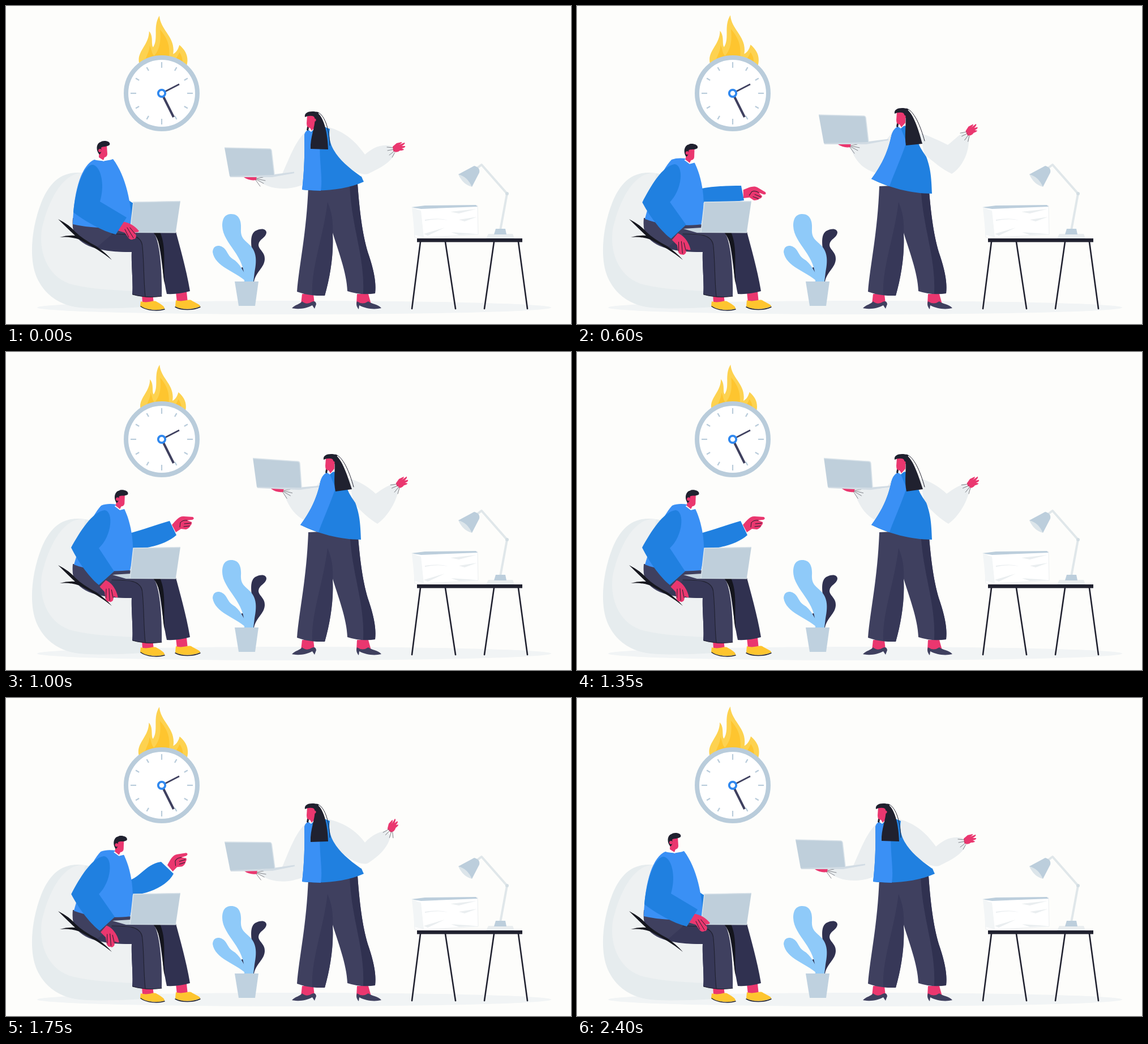
Animation of 998x561 px, one loop 2.45 s. Source, as an HTML page:

```html
<!DOCTYPE html>
<html lang="en">
<head>
<meta charset="utf-8">
<title>Office deadline</title>
<style>
  html, body { margin: 0; width: 100%; height: 100%; overflow: hidden; background: #fdfdfb; }
  svg { display: block; width: 100vw; height: 100vh; }
  .sky { fill: #3a90f5 } .blue { fill: #2080e0 } .skin { fill: #ea376f }
  .navy { fill: #3f405f } .dusk { fill: #373858 } .night { fill: #303150 } .ink { fill: #20212f }
  .cloth { fill: #eaeef0 } .steel { fill: #bccedc } .leaf { fill: #8fcaf9 }
  .sun { fill: #fec52f } .line { fill: none; stroke: #20212f; stroke-linecap: round }
  .crease { stroke: #55565f; stroke-width: .7 }
</style>
</head>
<body>
<svg viewBox="0 0 998 561">
  <ellipse cx="509" cy="532" rx="454" ry="12" fill="#f1f4f5"/>

  <g id="flame">
    <path fill="#fdd250" d="M238 108C226 82 253 72 253 45C261 54 256 68 260 73C270 58 259 37 271 18C273 44 300 55 295 85C301 82 304 76 306 69C319 80 323 92 318 108Z"/>
    <path class="sun" d="M246 108C243 92 254 84 254 70C258 78 257 84 262 88C272 76 274 62 272 42C286 58 293 74 285 108ZM290 108C296 98 303 90 306 82C313 92 312 100 310 108Z"/>
  </g>
  <circle cx="275" cy="154" r="63" fill="#fff" stroke="#b9ccdb" stroke-width="8"/>
  <g id="ticks" stroke="#b9ccdb" stroke-width="2.2"></g>
  <path d="M275 154L306 138" stroke="#3f405f" stroke-width="2.6"/>
  <path d="M275 154L296 196" stroke="#3f405f" stroke-width="4"/>
  <circle cx="275" cy="154" r="6.2" fill="#fff" stroke="#2f88ef" stroke-width="3.8"/>

  <!-- bean bag and seated man -->
  <path fill="#e6ecee" d="M150 297C105 286 80 305 63 345C45 390 40 445 54 478C70 514 100 529 130 532C165 535 205 533 240 531L245 400L130 320Z"/>
  <path fill="#eef1f2" d="M140 295C100 290 74 345 63 395C57 440 78 483 120 492C155 500 190 501 224 503L224 434L120 390Z"/>
  <path class="skin" d="M240 506H259L261 525H241ZM300 504H319L321 523H302Z"/>
  <path class="sun" d="M238 521C250 525 258 519 265 521C272 525 281 530 280 534C266 538 245 536 237 529ZM300 519C312 523 320 517 327 519C335 524 344 527 343 530C330 536 308 536 299 530Z"/>
  <path class="line" stroke-width="1.5" d="M238 530C248 537 267 539 280 535M299 531C310 537 330 537 343 531"/>
  <path class="night" d="M225 398H300C307 425 318 462 325 503Q305 509 284 508C276 470 274 430 266 404Z"/>
  <path class="navy" d="M118 374C150 374 200 380 222 386L259 398C272 408 276 470 275 512Q250 516 223 509C225 490 221 455 222 434C185 434 140 431 123 405Q116 396 118 374Z"/>
  <path class="dusk" d="M187 403C215 402 240 402 241 425C244 455 243 485 246 513L223 509C225 490 221 455 222 434Q185 434 160 426Z"/>
  <path fill="#14151d" d="M260 399H272C284 425 277 460 281 492C274 470 280 425 260 399Z"/>
  <path class="line" stroke-width="1.1" d="M187 402C215 402 240 402 241 425C244 455 243 485 246 512M224 509Q250 516 275 512"/>
  <path fill="#16171f" d="M92 376Q112 386 122 398Q135 411 160 424Q178 437 187 448Q165 430 130 412Q112 406 95 408Q108 404 122 405Q108 392 92 376Z"/>
  <g id="farHand">
    <path class="skin" d="M293 305C300 297 306 289 314 290L330 291Q334 294 329 296L320 297L328 300Q329 303 326 306Q324 311 318 313L309 312L300 318Z"/>
    <path class="line" stroke-width="1" d="M320 297Q312 296 308 301M326 302L315 303M324 307L314 308M308 301L307 309"/>
  </g>
  <path id="farSleeve" class="blue"/>
  <path id="torso" class="sky"/>
  <path fill="#c8d5de" d="M188 393L220 391V398L300 397V400.500L212 400Z"/>
  <path fill="#bfcfdb" d="M225 346L308 344L300 398L219 399Z"/>
  <path fill="none" stroke="#d8e2e9" stroke-width="1.600" d="M219 399L225 346L308 344.500"/>
  <g id="nearHand">
    <path class="skin" d="M202 381C214 379 228 388 235 397Q233 400 228 399L230 406Q229 412 225 411Q222 414 217 410L210 400L198 396Z"/>
    <path class="line" stroke-width="1" d="M214 391L225 409M219 391L228 402M210 394L217 408"/>
  </g>
  <path id="nearArm" class="blue"/>
  <g id="manHead">
    <path fill="#fff" d="M162 268L172 274L183 270L178 265H166Z"/>
    <path class="skin" d="M165 248L178 246L179 261Q179 266 174 267L172 272L164 267Z"/>
    <path class="ink" d="M165 262C157 253 161 241 167 240C171 236 186 238 183 245C178 249 171 247 168 250Q170 258 165 262Z"/>
    <circle class="skin" cx="166" cy="255" r="3"/>
  </g>

  <!-- plant -->
  <path class="night" d="M432 486C428 470 436 462 436 445C434 425 429 405 440 397C451 391 460 393 460 400C459 409 447 411 446 421C446 430 458 434 457 447C456 462 442 468 438 486ZM415 462L422 459L425 480Z"/>
  <path class="leaf" d="M424 486C405 468 369 460 365 434C366 423 374 421 382 425C391 430 391 440 400 446C413 453 421 470 428 486Z"/>
  <path class="leaf" d="M421 486C424 440 383 420 382 388C382 372 389 367 398 367C411 367 416 378 415 393C414 410 422 413 431 422C443 434 443 450 439 470L437 486Z"/>
  <path fill="#bfd1df" d="M404 486H446L440 529H411Z"/>

  <!-- table, papers and lamp -->
  <path fill="#fff" stroke="#eceff1" d="M720 357L833 352L834 403L736 409L722 408Z"/>
  <path fill="#f2f5f6" d="M717 356L733 361L738 408L722 404Z"/>
  <path class="cloth" d="M740 377Q765 373 781 378Q760 374 740 379ZM785 363L831 358L800 366ZM738 402L775 391L745 405ZM800 377L832 372L810 380ZM786 399L832 402L800 404Z"/>
  <path class="steel" d="M716 355L740 352L830 351L833 354L733 358Z"/>
  <path fill="none" stroke="#e0e7ea" stroke-width="4" stroke-linejoin="round" d="M873 396L885 331L840 280L828 289"/>
  <circle cx="885" cy="331" r="3" fill="#d3dde3"/>
  <path class="steel" d="M799 297L827 282Q838 285 836 294L823 319Z"/>
  <path fill="#dce5ea" d="M799 297Q815 301 823 319Q807 315 799 297Z"/>
  <path class="cloth" d="M852 402H895L898 410H848Z"/>
  <path class="steel" d="M865 393H882L884 403H862Z"/>
  <path class="ink" d="M726 410H912V416.500H726Z"/>
  <path class="line" stroke-width="2.600" d="M732 416L717 534M776 416L794 534M862 416L845 534M905 416L921 534"/>

  <!-- standing woman -->
  <path class="skin" d="M523 508H543L545 526H521ZM620 508H640L645 526H619Z"/>
  <path class="navy" d="M505 533C512 526 518 527 523 521Q531 528 540 522Q547 519 548 526L545 534L541 528C532 533 518 536 505 533ZM620 521Q630 528 640 521C646 526 658 526 663 533C650 536 635 534 624 528L623 535Q617 528 620 521Z"/>
  <path class="navy" d="M534 318L621 314C625 370 631 410 641 440C651 470 654 490 652 507Q628 511 603 503C602 470 586 430 577 400C579 440 572 480 563 511Q535 512 514 504C518 455 531 400 534 318Z"/>
  <path class="dusk" d="M568 346C576 365 578 380 577 405C579 440 572 480 563 511L541 510C539 460 560 410 568 346Z"/>
  <path class="night" d="M607 314H621C625 370 631 410 641 440C651 470 654 490 652 507L631 508C634 440 610 392 607 314Z"/>
  <g id="backHand">
    <path class="skin" d="M683 248L690 242L699 240Q700 242 694 245L704 241Q706 243 699 247L705 247Q706 250 699 251L703 253Q702 255 696 255Q690 260 684 256Z"/>
  </g>
  <path id="backSleeve" class="cloth"/>
  <path id="frontSleeve" class="cloth"/>
  <path id="backCuff" class="line crease" d="M684 250L673 249M685 253L674 255M686 256L677 263M687 258L682 267"/>
  <g id="laptop">
    <path class="skin" d="M420 302L443 301L442 307Q430 309 420 302Z"/>
    <path class="line crease" d="M443 304L454 302M443 305L458 308M442 306L455 313M441 307L449 318"/>
    <path fill="#d2dce4" d="M395 299L474 297L509 292.500V295L470 302H396Z"/>
    <path fill="#bfcfdb" d="M386 250L466 252Q468 252 469 255L474 298L395 300Z"/>
    <path fill="none" stroke="#d8e2e9" stroke-width="1.600" d="M386 250L466 252Q468 252 469 255L474 298"/>
  </g>
  <path id="vest" class="blue"/>
  <path id="vestLight" class="sky"/>
  <g id="womanHead">
    <path fill="#fff" d="M533 218L539 222L545 217L536 214Z"/>
    <path class="ink" d="M533 207L536 209L534 220L531 219Z"/>
    <path class="skin" d="M532 193H547L547 212L540 220L537 215Q531 215 531 207Z"/>
  </g>
  <path id="hair" class="ink"/>
  <path id="hairLine" class="line" stroke-width="1"/>
  <g id="fringe">
    <path class="ink" d="M528 196C526 186 541 184 552 188L550 206L545 200Q546 195 541 194Q534 193 528 196Z"/>
    <circle class="skin" cx="545" cy="201" r="2.600"/>
  </g>
</svg>
<script>
const LOOP = 2450, STEP = 50;
const $ = id => document.getElementById(id);

// Two-pose parts: out between go[0..1], back between go[2..3].
const there = (a, b, go) => [[go[0], a], [go[1], b], [go[2], b], [go[3], a]];
const MAN = [350, 650, 1700, 2060], WOMAN = [30, 330, 1400, 1700];

// The arms lag behind the bodies and settle after overshooting.
const swing = (rest, rise, ease, hold, fall) =>
  [[30, rest], [350, rise], [600, ease], [850, hold], [1390, hold], [1750, fall], [2150, rest]];
const point = (rest, out, up, end) =>
  [[350, rest], [600, out], [900, up], [1400, up], [1750, end], [2060, rest]];

const wave = swing('translate(0 0) rotate(0 684 254)', 'translate(23 -56) rotate(-22 684 254)',
  'translate(5 -28) rotate(-16 684 254)', 'translate(7 -17) rotate(-13 684 254)',
  'translate(-6 -19) rotate(-35 684 254)');

const tracks = {
  torso: there(
    'M156 271C135 280 120 320 118 385C150 392 190 394 222 388C222 350 212 300 189 270C178 274 166 274 156 271Z',
    'M168 271C150 290 130 340 120 375C150 387 190 388 219 385C230 350 222 300 207 273C196 268 180 266 168 271Z', MAN),
  nearArm: there(
    'M152 280C166 280 176 312 166 345L213 373L194 403C170 397 140 380 119 364C122 330 134 283 152 280Z',
    'M174 279C191 281 187 325 164 346L191 387L164 411C150 400 130 375 115 345C130 318 152 282 174 279Z', MAN),
  nearHand: there('translate(0 0) rotate(0 204 387)', 'translate(-29 22) rotate(28 204 387)', MAN),
  manHead: there('translate(0 0) rotate(0 170 255)', 'translate(31 5) rotate(6 170 255)', MAN),
  farSleeve: point(
    'M212 340C216 342 221 346 225 348L225 372C220 374 214 376 210 376Z',
    'M220 322C240 318 265 317 290 317L295 343C270 346 245 347 222 347Z',
    'M218 320C240 314 262 306 289 298L301 323C285 338 252 347 223 348Z',
    'M216 322C236 318 248 292 274 289L296 310C286 330 255 345 222 348Z'),
  farHand: point('translate(-58 72) rotate(27 296 310)', 'translate(-2 20) rotate(27 296 310)',
    'translate(0 0) rotate(0 296 310)', 'translate(-7 -11) rotate(-12 296 310)'),
  vest: there(
    'M534 218C528 222 527 225 527 232C528 265 526 300 523 324C560 328 600 324 632 310C628 302 629 301 626 300C592 276 566 250 572 217L560 212Z',
    'M570 211C560 215 557 222 555 230C548 262 535 285 520 305C550 320 590 331 627 331C626 300 624 285 617 266C610 255 598 242 602 222L592 212Z', WOMAN),
  vestLight: there(
    'M534 218C528 222 527 225 527 232C528 265 526 300 523 324L556 326C560 300 552 270 555 235Z',
    'M570 211C560 215 557 222 555 230C548 262 535 285 520 305L552 318C558 300 572 270 582 240Z', WOMAN),
  womanHead: there('translate(0 0)', 'translate(33 -6)', WOMAN),
  fringe: there('translate(0 0)', 'translate(33 -6)', WOMAN),
  hair: swing(
    'M546 187C558 189 568 215 569 253L538 252C537 232 546 215 546 196Z',
    'M579 181C592 183 606 205 610 246L579 246C579 228 582 210 580 190Z',
    'M579 181C591 183 602 212 610 243L581 246C578 228 582 210 580 190Z',
    'M579 181C591 183 602 214 611 242L582 246C578 228 582 210 580 190Z',
    'M546 187C558 189 568 215 569 253L538 254C537 232 546 215 546 196Z'),
  hairLine: there('M549 187C562 190 571 215 572 246', 'M582 181C595 184 607 212 614 238', WOMAN),
  backSleeve: swing(
    'M570 214C600 222 618 240 634 262C650 248 665 243 681 247L686 262C676 280 655 288 640 296C630 300 600 290 575 255Z',
    'M605 217C630 215 655 222 672 226C682 215 692 204 703 197L714 206C714 235 705 255 683 268C660 268 640 265 612 250Z',
    'M605 224C625 230 645 240 655 245C665 238 673 228 682 224L692 230C694 258 680 285 662 296C645 288 630 275 614 262Z',
    'M605 223C625 228 640 238 653 250C663 243 673 236 684 233L694 238C692 260 675 290 656 303C642 295 628 282 614 266Z',
    'M570 214C600 221 620 236 634 255C648 240 660 236 673 234L679 243C676 262 660 278 640 291C630 297 600 285 575 255Z'),
  backHand: wave,
  backCuff: wave,
  frontSleeve: swing(
    'M442 304C460 300 470 300 488 296C503 262 512 238 529 222L528 314C500 326 462 326 442 304Z',
    'M460 256C475 250 500 249 515 246C525 240 540 225 562 216L528 300C500 296 475 275 460 256Z',
    'M483 248C500 242 520 243 545 238C550 232 555 225 560 220L535 296C510 292 490 275 483 248Z',
    'M490 246C500 242 520 243 545 240C550 235 555 228 558 222L538 299C520 298 500 280 490 246Z',
    'M444 307C460 302 470 302 488 298C503 262 512 238 529 222L528 315C500 327 464 328 444 307Z'),
  laptop: swing('translate(0 0) rotate(0 395 300)', 'translate(18 -53) rotate(4 395 300)',
    'translate(41 -58) rotate(0 395 300)', 'translate(48 -62) rotate(2.5 395 300)',
    'translate(1 4) rotate(-1 395 300)')
};

const number = /-?\d+(\.\d+)?/g;

// Blends every number of one path or transform with its partner in another.
function mix(a, b, k) {
  const target = b.match(number);
  let i = 0;
  return a.replace(number, n => (+n + (target[i++] - n) * k).toFixed(2));
}

function valueAt(keys, t) {
  const next = keys.findIndex(key => key[0] > t);
  if (next < 0) return keys[keys.length - 1][1];
  if (next === 0) return keys[0][1];
  const [[t0, a], [t1, b]] = keys.slice(next - 1, next + 1);
  const u = (t - t0) / (t1 - t0);
  return mix(a, b, u * u * (3 - 2 * u));
}

function draw(now) {
  const t = Math.floor(now % LOOP / STEP) * STEP;
  for (const [id, keys] of Object.entries(tracks)) {
    const value = valueAt(keys, t);
    $(id).setAttribute(value[0] === 'M' ? 'd' : 'transform', value);
  }
  const flicker = 0.99 - 0.045 * Math.cos(2 * Math.PI * (8 * t / LOOP - 0.32));
  $('flame').setAttribute('transform', `translate(277 106) scale(${flicker}) translate(-277 -106)`);
  requestAnimationFrame(draw);
}

$('ticks').innerHTML = Array.from({ length: 12 }, (_, i) =>
  `<path d="M275 ${i % 3 ? 101 : 99}V${i % 3 ? 108 : 109}" transform="rotate(${i * 30} 275 154)"/>`).join('');
requestAnimationFrame(draw);
</script>
</body>
</html>
```
